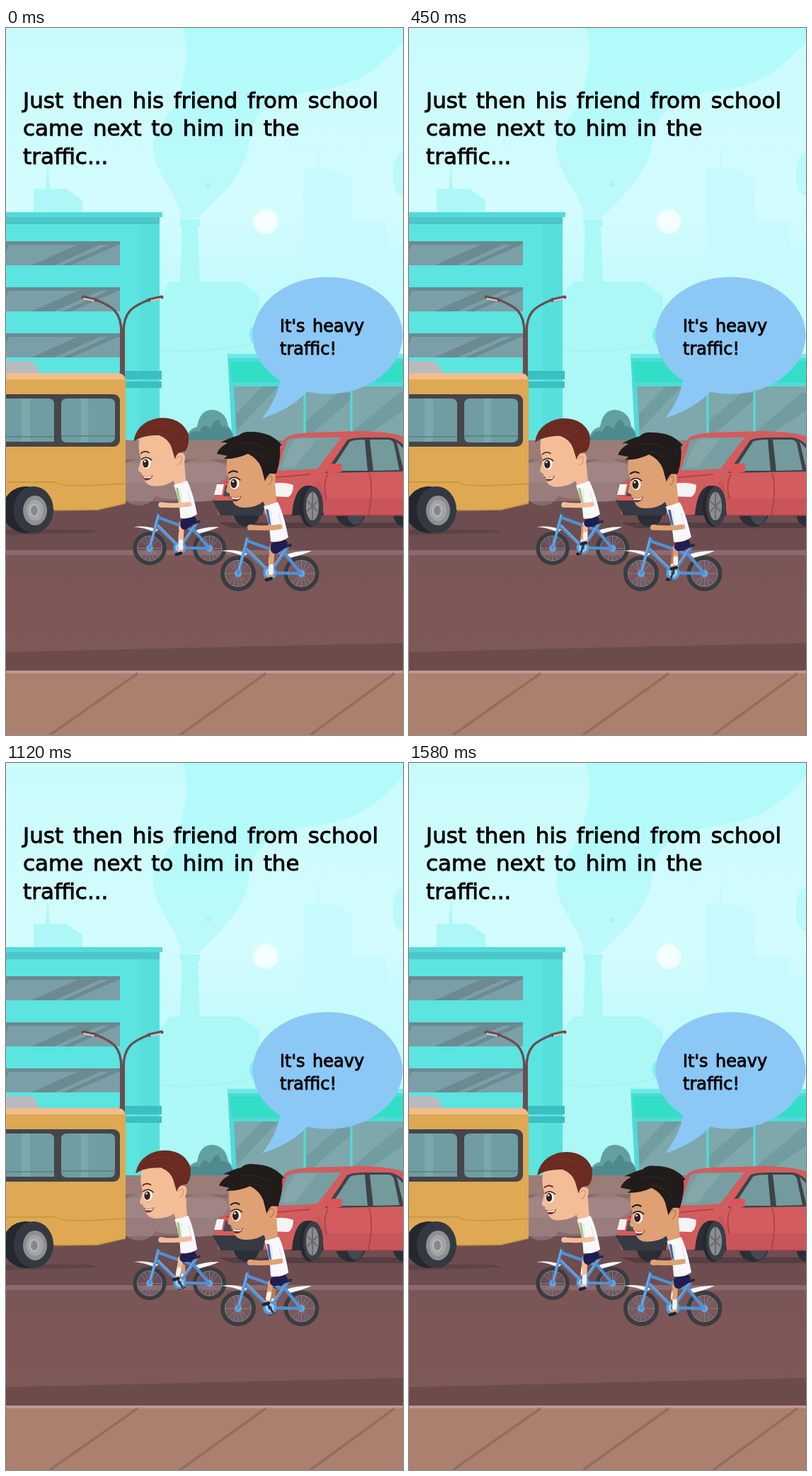
These frames come from a looping animation (561 by 998 pixels, 1.64 s). An HTML page:

```html
<!DOCTYPE html>
<html lang="en">
<head>
<meta charset="utf-8">
<style>
html, body { margin: 0; height: 100%; overflow: hidden; background: #d3fbfd; }
svg { display: block; width: 100vw; height: 100vh; }
text { font-family: "DejaVu Sans", sans-serif; stroke: #000; stroke-width: .9; word-spacing: .12em; }
.line { fill: none; stroke-linecap: round; stroke-linejoin: round; }
</style>
</head>
<body>
<svg viewBox="0 0 561 998">
<defs>
  <linearGradient id="sky" x2="0" y2="1">
    <stop stop-color="#c9fbfb"/><stop offset=".42" stop-color="#d3fcfe"/>
    <stop offset=".75" stop-color="#baf9fa"/><stop offset="1" stop-color="#a3f6f5"/>
  </linearGradient>
  <linearGradient id="smoke" x2="0" y2="1">
    <stop stop-color="#b1fbfa"/><stop offset="1" stop-color="#bdf9fb"/>
  </linearGradient>
  <linearGradient id="road" x2="0" y2="1">
    <stop stop-color="#7b5657"/><stop offset="1" stop-color="#7f5955"/>
  </linearGradient>
</defs>

<!-- sky and skyline -->
<rect width="561" height="600" fill="url(#sky)"/>
<path fill="url(#smoke)" d="M248 270C240 225 207 205 208 165C210 135 242 120 247 85C252 60 262 35 249 0H561V18C530 55 500 80 440 88C375 97 348 118 344 160C340 205 300 240 272 268ZM561 172Q545 185 547 212T561 236Z"/>
<circle cx="286" cy="221" r="3" fill="#a5f3f4"/>
<circle cx="367" cy="273" r="18" fill="#e7feff"/>
<circle cx="367" cy="273" r="15.5" fill="#f6ffff"/>
<path fill="#c7fafd" d="M420 198H439L441 158L443 198H462L489 214V273H538V310H561V480H420Z"/>
<path fill="#aef7f7" d="M39 262V227H56L59 190L62 227H85L108 243V262Z"/>
<path fill="#abf8f6" d="M215 380L232 358H246L249 280H246V270H274V280H271L274 358H330L358 378V580H215Z"/>
<path fill="none" stroke="#9eeff0" d="M215 455Q290 460 350 445"/>
<circle cx="361" cy="433" r="17" fill="#7deeee"/>

<!-- office block -->
<path fill="#5be4e0" d="M0 265H217V590H0Z"/>
<path fill="#56dfdb" d="M189 267H217V590H189Z"/>
<path fill="#4cc6c8" d="M0 267H217V277H0Z"/>
<path fill="#52dbdb" d="M0 260H221V267H0Z"/>
<g id="windows"></g>
<path fill="#3cbfc2" d="M160 484H220V496H160ZM160 499H220V508H160Z"/>

<!-- street lamp -->
<g class="line" stroke="#6b4d50">
  <path stroke-width="7" stroke-linecap="butt" d="M164.500 427V492"/>
  <path stroke-width="3.500" d="M163 430C163 400 150 393 128 384M166 430C166 400 179 393 201 384"/>
  <path stroke-width="5" d="M109 380L127 384M220 380L202 384"/>
  <path stroke="#d9d4d4" stroke-width="2" d="M110 382L124 385M219 382L205 385"/>
</g>

<!-- shop -->
<path fill="#4fdad8" d="M313 460H561V590H320Z"/>
<path fill="#33dec6" d="M316 471H561V500H319Z"/>
<path fill="#6cebe5" d="M313 460H561V466H313Z"/>
<path fill="#7ea8ab" d="M322 506H561V585H326Z"/>
<path fill="#719ca0" d="M325 545L362 506H385L326 568ZM424 555L470 515H487V525L424 580ZM492 568L555 515H561V540L510 575H492Z"/>
<path fill="none" stroke="#54dcd9" stroke-width="3" d="M422 500V585M488 500V585"/>

<!-- bushes and wall -->
<path fill="#64a09f" d="M254 584Q256 566 270 563Q274 538 292 539Q311 541 314 562Q322 570 322 584Z"/>
<path fill="#4e8a8e" d="M254 584Q260 565 273 570Q280 555 288 566Q300 542 304 562Q320 562 322 584Z"/>
<path fill="#9b7c76" d="M160 582H561V612H160Z"/>
<path fill="#876a69" d="M160 609H561V672H160Z"/>
<path fill="#957776" d="M160 614H561V642H160Z"/>

<!-- road and pavement -->
<path fill="#6d4d50" d="M0 668H561V740H0Z"/>
<path fill="url(#road)" d="M0 738H561V908H0Z"/>
<path fill="#8b6a6c" d="M0 737H561V744H0Z"/>
<path fill="#6c4c4b" d="M0 881L561 868V908H0Z"/>
<path fill="#ab806e" d="M0 908H561V998H0Z"/>
<path fill="#bd9a92" d="M0 907H561V911H0Z"/>
<path fill="none" stroke="#946d5e" stroke-width="3.500" d="M186 911L62 998M367 911L246 998M549 911L430 998"/>

<!-- exhaust -->
<g fill="#b59a9b" opacity=".4">
  <ellipse cx="195" cy="632" rx="37" ry="24"/><ellipse cx="235" cy="638" rx="44" ry="27"/>
  <ellipse cx="278" cy="627" rx="36" ry="18"/><ellipse cx="188" cy="655" rx="24" ry="19"/>
  <ellipse cx="268" cy="652" rx="40" ry="17"/>
</g>

<!-- bus -->
<path fill="#5d4347" d="M0 708H118L132 712L0 716Z"/>
<path fill="#b9babf" d="M0 470H32Q45 472 46 488H0Z"/>
<path fill="#dea952" d="M0 487H158Q169 488 169 499V671L130 680H0Z"/>
<path fill="#f0bd8b" d="M0 487H158Q167 488 168 496H0Z"/>
<path fill="none" stroke="#c6923f" stroke-width="1.500" d="M0 641H70Q75 650 169 643M68 681L130 680L169 671"/>
<rect x="-20" y="517" width="181" height="74" rx="9" fill="#45454a"/>
<path fill="#6f9da1" d="M0 523H60Q68 523 68 531V584H0ZM86 523H146Q154 523 154 531V577Q154 585 146 585H86Q78 585 78 577V531Q78 523 86 523Z"/>
<path fill="#7ba8aa" d="M22 523H34V584H22ZM106 523H116V585H106Z"/>
<path fill="none" stroke="#4c6a70" d="M0 577H68M78 576H154"/>
<ellipse cx="28" cy="680" rx="33" ry="33" fill="#24272e"/>
<ellipse cx="39" cy="680" rx="28" ry="33" fill="#343840"/>
<ellipse cx="41" cy="681" rx="17" ry="21" fill="#8d8f92"/>
<ellipse cx="41" cy="681" rx="12" ry="15" fill="#a2a4a6"/>
<ellipse cx="40" cy="681" rx="6" ry="8" fill="#85878a" stroke="#b8babb" stroke-width="2"/>

<!-- car -->
<path fill="#553d42" d="M300 698H561V706H320Z"/>
<g fill="#2b2e36">
  <ellipse cx="340" cy="685" rx="18" ry="19"/><ellipse cx="487" cy="684" rx="21" ry="20"/>
  <ellipse cx="563" cy="684" rx="16" ry="20"/><path d="M402 688V642H450V688Z"/>
</g>
<ellipse cx="494" cy="683" rx="12" ry="18" fill="#444852"/>
<path fill="#d35c5e" d="M294 660Q296 643 312 638L375 625L393 581Q398 573 430 571L500 569Q548 570 561 577V688H449Q446 645 424 646Q407 650 404 687H300Z"/>
<path fill="#c9555a" d="M449 688Q448 655 436 642L460 632H561V688Z"/>
<path fill="#d35c5e" d="M440 632H561V664H452Z"/>
<path fill="#779fa1" d="M384 624L397 583Q401 579 420 578H474L440 622Q405 625 384 624Z"/>
<path fill="#84a8a9" d="M399 596L410 580H440L408 620H390Z"/>
<path fill="#3e4247" d="M451 628L482 582Q488 578 512 578H541Q552 579 561 588V626Z"/>
<path fill="#739a9d" d="M459 625L486 584Q490 581 507 581L511 625ZM514 581H541Q546 582 548 586L556 624L519 625ZM552 584L561 593V621Z"/>
<path fill="none" stroke="#a63e46" stroke-width="1.500" d="M513 628Q520 650 512 688M455 629Q447 645 453 665M310 641Q370 635 430 630M449 688H561"/>
<path fill="#d9575a" d="M455 617Q463 613 475 616V626Q464 630 453 627Z"/>
<path fill="#f5f3f2" d="M298 644H308L305 659H294ZM375 643Q393 640 406 645Q406 658 399 662L371 661Z"/>
<path fill="#363a42" d="M292 667H367L363 688H303Z"/>
<path fill="#494b54" d="M310 646H370L366 661H307Z"/>
<ellipse cx="430" cy="675" rx="15" ry="29" fill="#25282f"/>
<ellipse cx="434" cy="675" rx="14" ry="28" fill="#3a3e46"/>
<ellipse cx="433" cy="675" rx="9" ry="20" fill="#8b8d91"/>
<path stroke="#676a70" stroke-width="2" d="M433 656V694M426 668L440 682M426 682L440 668"/>

<!-- speech and caption -->
<path fill="#8bc8f6" d="M388 490Q386 520 362 551Q405 537 428 511Z"/>
<ellipse cx="454.500" cy="434" rx="106" ry="82.500" fill="#8bc8f6"/>
<g font-size="24"><text x="387" y="429">It's heavy</text><text x="387" y="461">traffic!</text></g>
<g font-size="31"><text x="24" y="113">Just then his friend from school</text><text x="24" y="152">came next to him in the</text><text x="24" y="192">traffic...</text></g>

<g id="riders"></g>
</svg>
<script>
const LOOP = 1640, BOB = 400, PEDAL = 800;
const CRANK = [373, 769], HIP = [391, 728];
// Upper body sway over one bob: [phase, dx, dy]
const SWAY = [[0, 0, 0], [.125, -3, 1], [.275, 5, -4], [.325, 10, -6],
              [.45, 10, -8], [.75, 4, -7], [.95, 1, -2], [1, 0, 0]];
const $ = id => document.getElementById(id);

$('windows').innerHTML = [301, 366, 431].map(y => {
  const h = 34;
  return `<path fill="#7b9fa6" d="M0 ${y}H161v${h}H0Z"/>
    <path fill="#6b8a91" d="M0 ${y}H161v5H0ZM36 ${y + h}L112 ${y}h32L68 ${y + h}ZM80 ${y + h}L156 ${y}h5v4L92 ${y + h}ZM0 ${y}h6L0 ${y + 14}Z"/>`;
}).join('');

const line = (color, width, d, cls = '') =>
  `<path class="line ${cls}" stroke="${color}" stroke-width="${width}" d="${d}"/>`;

const wheel = x => `<g transform="translate(${x} 770)">
  ${line('#6f91b8', .8, 'M0-20V20M-20 0H20M-14-14L14 14M14-14L-14 14M-8-19L8 19M8-19L-8 19')}
  <circle r="22" fill="none" stroke="#3a3c40" stroke-width="6"/>
  <circle r="18.500" fill="none" stroke="#73849a"/>
  <circle r="5" fill="#68a5df"/><circle r="2" fill="#9bc8ee"/></g>`;

const leg = (side, skin) => `<g class="${side}">
  ${line(skin, 9, '', 'thigh')}${line(skin, 7, '', 'shin')}
  ${line('#f1f1f4', 6.500, '', 'sock')}${line('#23232d', 4.500, '', 'shoe')}
  ${line('#201d50', 13, '', 'shorts')}</g>`;

function rider({ place, skin, shade, hair, gloss, tie }) {
  return `<g class="rider" transform="${place}">
  ${leg('far', shade)}
  ${wheel(328)}${wheel(417.5)}
  <path fill="#fafafa" d="M304 738Q322 735 341 742L336 746Q320 739 304 738ZM394 744Q412 737 432 738Q419 744 400 748Z"/>
  ${line('#4f91d4', 4.500, 'M342 717L328 770M341 724L394 743M338 735L373 769L398 733M373 769L417 770L393 741')}
  ${line('#83b7e8', 1.200, 'M341 718L329 765M341 735L372 766M376 762L395 735')}
  ${line('#545860', 4, 'M342 718V711Q340 704 346 703')}
  ${line('#2b2b38', 4, 'M388 734L402 730')}
  <circle cx="373" cy="769" r="8" fill="#a4caec" stroke="#579bdb" stroke-width="3.500"/>
  <circle cx="373" cy="769" r="3" fill="#4383c1"/>
  ${line('#2d2d36', 2.500, '', 'crank')}
  ${leg('near', skin)}
  <g class="torso">
    <path fill="${skin}" d="M358 655L380 642L383 677L368 680Z"/>
    <path fill="#f8f8fc" d="M364 675Q374 673 384 669Q392 684 399 719Q388 727 374 725Q373 700 364 675Z"/>
    <path fill="${tie}" d="M367 679L371 680L375 705L371 699Z"/>
    <path fill="none" stroke="#d7d9e3" d="M374 681L376 708L391 706L385 684"/>
  </g>
  ${line(skin, 7, '', 'arm')}
  ${line(skin, 8, 'M345 705L347 705')}
  <g class="head">
    <path fill="${skin}" d="M314 602Q309 620 315 636Q313 647 311 652Q311 656 316 657Q316 663 320 667Q323 677 336 677Q354 677 364 668L373 650Q380 648 381 635Q381 625 371 628L365 600Z"/>
    <path fill="none" stroke="${shade}" stroke-width="1.500" d="M368 636Q376 628 376 637Q375 644 370 645"/>
    <path fill="#7a2f2c" d="M316 661Q326 665 333 660Q330 670 321 668Z"/>
    <path fill="#fff" d="M318 662Q326 665 332 661L329 665H320Z"/>
    <g class="open">
      <ellipse cx="323" cy="643" rx="6.500" ry="8" fill="#fff"/>
      <ellipse cx="322" cy="643" rx="4.500" ry="6.500" fill="#35211d"/>
      <circle cx="321" cy="640" r="1.500" fill="#fff"/>
      ${line('#2b1c1a', 1.500, 'M316 637Q323 631 331 638')}
    </g>
    <g class="shut">
      <ellipse cx="323" cy="642" rx="7" ry="7" fill="${shade}"/>
      ${line('#2b1c1a', 1.800, 'M316 645Q323 649 331 644')}
    </g>
    ${line(hair[0], 2, 'M315 628Q321 623 327 627')}
    <path fill="${hair[0]}" d="${hair[1]}"/>
    ${line(gloss, 1, 'M326 589Q345 580 367 594M342 597Q358 599 371 613')}
  </g></g>`;
}

$('riders').innerHTML = rider({
  place: 'translate(-106.960 6.900) scale(.945)',
  skin: '#f3bd98', shade: '#d59b78', gloss: '#7a3529', tie: '#a4c878',
  hair: ['#6c2b22', 'M304 610Q307 592 321 583Q340 571 362 577Q379 582 386 599Q388 616 381 625L372 627Q367 631 366 637L361 620Q357 607 342 601Q325 601 314 605Z']
}) + rider({
  place: '',
  skin: '#dfa074', shade: '#b97b56', gloss: '#352b28', tie: '#4169a5',
  hair: ['#211b1a', 'M298 601Q301 592 313 586Q307 584 303 585Q320 577 329 575Q335 569 346 570Q375 570 390 589L387 590Q389 607 382 629L373 629Q368 633 366 640L361 621Q356 608 342 601Q325 609 308 608L313 604Z']
});

function swayAt(phase) {
  const i = SWAY.findIndex(k => k[0] > phase), a = SWAY[i - 1], b = SWAY[i];
  const u = (phase - a[0]) / (b[0] - a[0]);
  return [1, 2].map(n => a[n] + (b[n] - a[n]) * u);
}

const mix = (a, b, u) => [a[0] + (b[0] - a[0]) * u, a[1] + (b[1] - a[1]) * u];
const seg = (a, b) => `M${a}L${b}`;

function footAt(angle) {
  return [CRANK[0] - 7 * Math.sin(angle), CRANK[1] + 8 * Math.cos(angle)];
}

function poseLeg(el, foot) {
  const set = (name, a, b) => el.querySelector('.' + name).setAttribute('d', seg(a, b));
  const knee = [376 + (foot[0] - CRANK[0]) * .4, 739 + (foot[1] - 777) * .35];
  const ankle = [foot[0] + 1, foot[1] - 3];
  set('thigh', HIP, knee);
  set('shin', knee, ankle);
  set('sock', mix(knee, ankle, .6), mix(knee, ankle, .85));
  set('shoe', [foot[0] + 2, foot[1]], [foot[0] - 5, foot[1] + 2]);
  set('shorts', HIP, mix(HIP, knee, .7));
}

const riders = [...document.querySelectorAll('.rider')];
function draw() {
  const t = performance.now() % LOOP;
  const [dx, dy] = swayAt(t % BOB / BOB);
  const angle = t / PEDAL * 2 * Math.PI;
  const near = footAt(angle), far = footAt(angle + Math.PI);
  const blink = t > 130 && t < 235;
  for (const r of riders) {
    const part = name => r.querySelector('.' + name);
    poseLeg(part('near'), near);
    poseLeg(part('far'), far);
    part('crank').setAttribute('d', seg(near, far));
    part('arm').setAttribute('d', `M${387 + dx * .25} ${704 + dy * .2}Q370 707 346 705`);
    part('torso').setAttribute('transform', `rotate(${dx * .5} 390 725)`);
    part('head').setAttribute('transform',
      `translate(${dx * .65} ${dy * .6}) rotate(${dx * .27} 372 660)`);
    part('open').style.display = blink ? 'none' : '';
    part('shut').style.display = blink ? '' : 'none';
  }
  requestAnimationFrame(draw);
}
draw();
</script>
</body>
</html>
```
